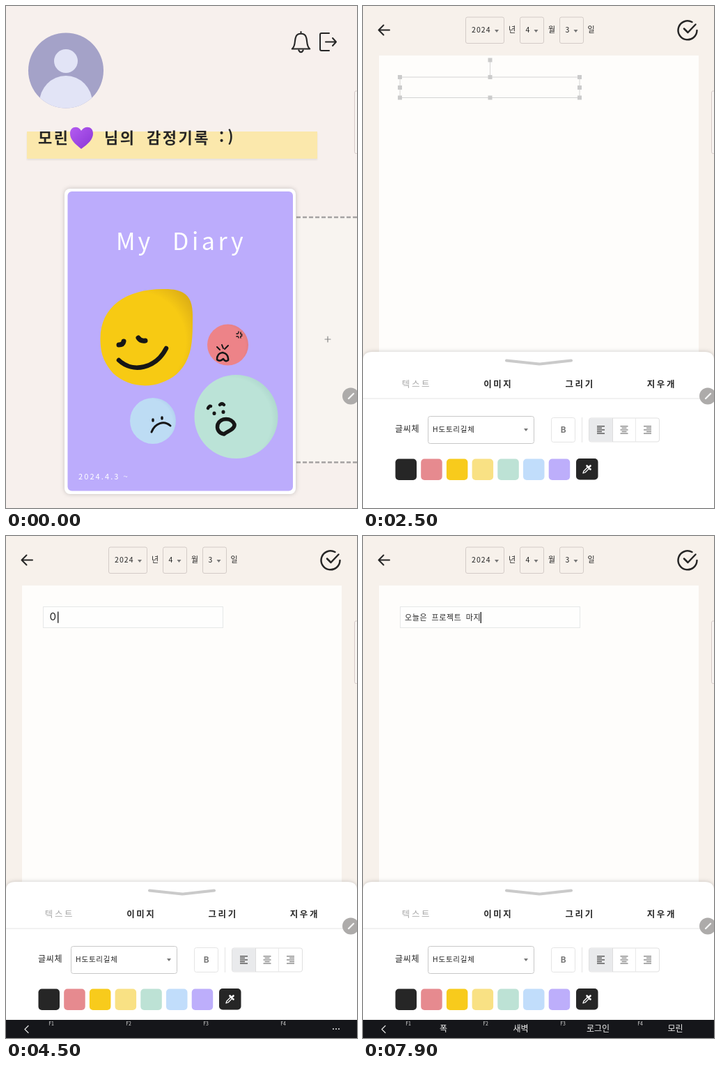
Write an HTML page that moves like this. It is 504 px wide and 720 px high and loops after 8 s.

```html
<!DOCTYPE html>
<html lang="ko">
<head>
<meta charset="utf-8">
<title>Emotion diary</title>
<style>
html, body { margin: 0; width: 100%; height: 100%; overflow: hidden; background: #f7f1ec }
svg { display: block; width: 504px; height: 720px }
text { font-family: "Noto Sans CJK KR", "Noto Sans", sans-serif; white-space: pre }
.ln { fill: none; stroke: #262626; stroke-width: 2; stroke-linecap: round; stroke-linejoin: round }
.field { fill: none; stroke: #d3cbc7 }
.soft { filter: drop-shadow(0 0 3px #0003) }
</style>
</head>
<body>
<svg id="stage" viewBox="0 0 504 720"></svg>
<script>
const LOOP = 8000, INK = '#262626';
const stage = document.getElementById('stage');

const rect = (x, y, w, h, fill, more = '') =>
  `<rect x="${x}" y="${y}" width="${w}" height="${h}" fill="${fill}" ${more}/>`;
const circle = (x, y, r, fill, more = '') =>
  `<circle cx="${x}" cy="${y}" r="${r}" fill="${fill}" ${more}/>`;
const line = (d, more = '') => `<path class="ln" d="${d}" ${more}/>`;
const thick = (d, w, color = '#161616') => line(d, `style="stroke-width:${w};stroke:${color}"`);
const text = (x, y, size, str, { fill = INK, weight = 400, gap = 0, mid = false, id = '' } = {}) =>
  `<text ${id && `id="${id}"`} x="${x}" y="${y}" font-size="${size}" fill="${fill}" font-weight="${weight}"
    letter-spacing="${gap}" word-spacing="${id ? 2.7 : 0}" text-anchor="${mid ? 'middle' : 'start'}">${str}</text>`;
const group = (id, body) => `<g id="${id}">${body}</g>`;
const caret = (x, y) => `<path d="M${x - 3} ${y - 2}h6l-3 4z" fill="#777"/>`;
const bell = (x, y, scale) => `<g transform="translate(${x} ${y}) scale(${scale})">`
  + line('M-12 9H12C7 5 9-2 7-7C5-13-5-13-7-7C-9-2-7 5-12 9ZM-3 11Q0 16 3 11M0-12V-14') + '</g>';

const home = () => {
  const heart = 'M108 205C98 197 92 191 92 183C92 172 104 171 108 179C113 171 125 172 125 183C125 191 118 198 108 205Z';
  const yellow = 'M135.500 480C134 432 172 406 225 406C262 405 269 420 268 450C268 483 267 507 245 528C217 551 178 549 154 527C141 512 136 500 135.500 480Z';
  const bold = { weight: 700, gap: 2.5 };
  return rect(0, 0, 504, 720, '#f7f0ed') + rect(417, 303, 87, 351, '#f8f4f0')
    + circle(86, 92.500, 54, '#a4a2c8')
    + circle(86, 79, 17, '#e2e4f6')
    + '<ellipse cx="86" cy="139" rx="38" ry="39" fill="#e2e4f6" clip-path="url(#face)"/>'
    + bell(423.500, 52, 1.06)
    + line('M464 39H453Q451 39 451 41V62Q451 64 453 64H464M459 51.500H474M469 46L474 51.500L469 57')
    + rect(30, 180, 417, 39, '#fbe8ac', 'style="filter:drop-shadow(0 2px 1px #0001)"')
    + text(46, 197, 22, '모린', bold)
    + `<path d="${heart}" fill="url(#violet)"/>`
    + text(141, 197, 22, '님의', bold)
    + text(202, 197, 22, '감정기록', bold)
    + text(306, 196, 22, ':)', { weight: 700, gap: 5 })
    + line('M417 303H504M417 654.500H504',
        'style="stroke:#a5a2a2;stroke-width:2.500;stroke-linecap:butt;stroke-dasharray:6 3"')
    + thick('M458 478H466M462 474V482', 1.2, '#888')
    + rect(84, 262, 332, 438, '#fff', 'rx="8" class="soft"')
    + rect(88.500, 266, 323.500, 429.500, '#bcacfc', 'rx="6"')
    + text(158, 350, 34, 'My', { fill: '#fff', gap: 4 })
    + text(239, 350, 34, 'Diary', { fill: '#fff', gap: 4.5 })
    + `<path d="${yellow}" fill="url(#gold)"/>`
    + thick('M162 486Q168 486 169 481M190 476Q193 481 200 480', 7)
    + thick('M162 508C182 527 215 520 230 491', 6.5)
    + circle(318.500, 486, 29.500, 'url(#rose)')
    + thick('M303 489L307 493M310 486L312 491M319 487L314 492', 2)
    + thick('M303 507Q303 498 311 497Q320 499 319 508Q315 511 312 506Q307 511 303 507Z', 2.5)
    + thick('M331 470Q334 471 334 467M337 468Q336 471 339 471M331 474Q334 473 334 476M337 476Q336 473 339 473', 1.4)
    + circle(211, 595, 33, 'url(#sky)')
    + thick('M211 593V595M224 590V592', 3.5)
    + thick('M209 611C214 598 227 594 236 602', 3)
    + circle(330.500, 589, 60, 'url(#mint)')
    + thick('M290 577Q292 573 294 574M307 572Q310 569 313 572', 4.5)
    + thick('M299 584V584.500M312 582V582.500', 5)
    + thick('M304 600C308 590 324 590 328 600C329 607 318 610 313 614C306 613 302 607 304 600Z', 5.5)
    + text(104, 679, 11, '2024.4.3 ~', { fill: '#fff', gap: 2.1 });
};

const calendar = () => {
  const days = ['SUN', 'MON', 'TUE', 'WED', 'THU', 'FRI', 'SAT'];
  const book = (x, y, turn, fill, face) => `<g transform="translate(${x} ${y}) rotate(${turn})">`
    + rect(-9, -13, 19, 26, fill, 'rx="2"') + circle(0, 2, 5, face) + '</g>';
  let s = rect(0, 0, 504, 720, '#f6f0eb')
    + thick('M26 30.500H41M26 36H41M26 41.500H41', 1.6, '#333')
    + thick('M170 83L166 87.500L170 92M325 83L329.500 87.500L325 92', 2)
    + text(197, 95, 19, '2024년 4월', { weight: 700, gap: 1.2 })
    + book(401, 89, -7, '#f7dc62', '#b9dfd0') + book(413, 87, 9, '#ea7d83', '#f6ca25')
    + text(429, 93, 9, '일기쓰기', { weight: 500, gap: 1.2 })
    + thick('M428 98.500H470', 1)
    + rect(25, 118, 454, 459, '#fff');
  days.forEach((d, i) => s += text(58.500 + 64.9 * i, 138, 8, d, { weight: 700, gap: .4, mid: true }));
  for (let i = 0; i < 35; i++) {
    const n = i ? (i - 1) % 30 + 1 : 31;
    s += text(32.500 + 64.8 * (i % 7), 167 + 85.5 * Math.floor(i / 7), 10, n, { weight: 500, gap: .8 });
  }
  for (let i = 0; i < 6; i++) s += rect(25, 149.3 + 85.5 * i, 454, 1.5, '#3b3b3b');
  return s + rect(0, 670, 504, 50, '#fff', 'class="soft"')
    + circle(84, 690, 4.7, 'none', 'class="ln" style="stroke-width:1.600"')
    + thick('M75 704V702Q76 697 82 697H87Q93 697 93 702V704Z', 1.6, INK)
    + circle(252, 694, 13, '#e4969a')
    + bell(420.500, 695, .78);
};

const editor = () => {
  const selects = [[147, 56, '2024', 156, 192], [225, 35, '4', 233.500, 248.500], [282, 35, '3', 290.500, 305.500]];
  return rect(0, 0, 504, 720, '#f7f1eb') + rect(23, 71, 459, 640, '#fefdfb')
    + line('M38 34.500H23M29.500 27.500L22.500 34.500L29.500 41.500')
    + selects.map(([x, w, s, tx, cx]) => `<rect class="field" x="${x + .5}" y="16" width="${w - 1}" height="37.500" rx="2.500"/>`
      + text(tx, 38, 10.5, s, { gap: 1.1 }) + caret(cx, 36)).join('')
    + ['년', '월', '일'].map((s, i) => text([214, 271, 327.500][i], 38, 11, s, { mid: true })).join('')
    + thick('M472.500 23A13.500 13.500 0 1 0 479.500 35M461 32.500L466.500 38L477.500 26.500', 2.5, INK);
};

const panel = () => {
  const tabs = ['텍스트', '이미지', '그리기', '지우개'];
  const colors = [INK, '#e68a8f', '#f8cb1c', '#f9e184', '#bde2d5', '#c1ddfb', '#bdaefb'];
  const bars = (x, shift, ink) => [0, 1, 2, 3, 4].map(i => {
    const w = i % 2 ? 7 : 11;
    return rect(x - 5.5 + (11 - w) * shift, 602 + i * 2.6, w, 1.4, ink);
  }).join('');
  return '<path class="soft" d="M0 720V508Q0 496 14 496H490Q504 496 504 508V720Z" fill="#fff"/>'
    + thick('M206 508.500L253 513.500L299 508.500', 4, '#cacaca')
    + tabs.map((s, i) => text(77 + 117.3 * i, 547, 12.5, s,
        { weight: i ? 700 : 400, fill: i ? INK : '#aaa', gap: 2.6, mid: true })).join('')
    + rect(0, 562.500, 504, 1, '#e3e3e3')
    + text(46, 611, 12, '글씨체', { weight: 500, gap: .7 })
    + rect(93.500, 588.500, 152, 39, '#fff', 'rx="3" stroke="#c8c8c8"')
    + text(100, 611, 10.5, 'H도토리길체', { weight: 500, gap: .8 }) + caret(234, 608)
    + rect(270.500, 590.500, 34, 35, '#fff', 'rx="3" stroke="#e4e4e4"')
    + text(287.500, 612, 12, 'B', { weight: 700, fill: '#777', mid: true })
    + rect(314, 590, 1, 36, '#e4e4e4')
    + rect(324.500, 591, 101, 34, '#fff', 'rx="3" stroke="#e0e0e0"')
    + rect(325, 591.500, 33, 33, '#e9eaec')
    + rect(358, 591, 1, 34, '#ddd') + rect(391, 591, 1, 34, '#e8e8e8')
    + bars(341.500, 0, '#555') + bars(375, .5, '#8a8a8a') + bars(408.500, 1, '#8a8a8a')
    + colors.map((c, i) => rect(46.500 + 36.7 * i, 649.500, 30.500, 30.500, c, 'rx="5"')).join('')
    + rect(306, 649, 31.500, 30.500, INK, 'rx="5"')
    + thick('M316 670L317 667L323 661L325 663L319 669Z', 1.3, '#fff')
    + thick('M321.500 659.500L326.500 664.500M324 662L326.500 659.500', 2.6, '#fff');
};

const handles = () => {
  const spots = [[53, 102], [182.500, 102], [311, 102], [53, 117], [311, 117], [53, 131.500], [182.500, 131.500], [311, 131.500], [182.500, 77.500]];
  return thick('M182.500 78V102M53.500 102H311V131.500H53.500Z', 1, '#d4d4d4')
    + spots.map(([x, y]) => rect(x - 3, y - 3, 6, 6, '#cbcbcb')).join('');
};

const bar = () => rect(0, 694, 504, 26, '#15161a')
  + thick('M32 702.500L27 707.500L32 712.500', 1.3, '#ddd')
  + [0, 1, 2, 3].map(i => text(65 + 111 * i, 702, 7, 'F' + (i + 1), { fill: '#ddd', mid: true })).join('');

const dots = () => [470, 474, 478].map(x => circle(x, 707, 1.1, '#ddd')).join('');

const words = () => ['폭', '새벽', '로그인', '모린']
  .map((s, i) => text(115.500 + 111 * i, 711, 12, s, { fill: '#eee', mid: true })).join('');

// Flat fill that darkens towards the right and the rim
const glow = (id, a, b) => `<radialGradient id="${id}" cx=".42" cy=".54" r=".68">
  <stop offset=".74" stop-color="${a}"/><stop offset="1" stop-color="${b}"/></radialGradient>`;

stage.innerHTML = `<defs>
  <clipPath id="face"><circle cx="86" cy="92.500" r="54"/></clipPath>
  <linearGradient id="violet" x2="1" y2="1"><stop stop-color="#b45cf0"/><stop offset="1" stop-color="#8a35d6"/></linearGradient>
  ${glow('gold', '#f7ca13', '#deb016')}${glow('rose', '#ed8388', '#d97880')}
  ${glow('sky', '#bddcf4', '#a9c9ea')}${glow('mint', '#bbe3d7', '#a2cdc5')}</defs>`
  + group('home', home()) + group('calendar', calendar())
  + group('editor', editor())
  + group('handles', handles())
  + group('entry', rect(53.500, 101.500, 258, 30, '#fefefd', 'stroke="#e6e8e8"'))
  + text(62, 123, 17, '이', { id: 'draft' })
  + text(60, 121, 11, '', { id: 'typed', gap: .6 })
  + rect(0, 109, 1.4, 16, INK, 'id="cursor"')
  + group('panel', panel()) + group('keyboard', rect(0, 491.500, 504, 228.500, '#202020'))
  + group('bar', bar()) + group('dots', dots()) + group('words', words())
  + rect(500.500, 122, 10, 89.500, '#f8f4f1', 'rx="2" stroke="#d6cac8"')
  + circle(495, 559.500, 12, '#adabaa', 'id="knob"')
  + thick('M492 563L499 556', 2.4, '#f4f4f4').replace('<path', '<path id="pen"');

const el = id => document.getElementById(id);
const show = (id, on) => el(id).setAttribute('visibility', on ? 'visible' : 'hidden');

// Each entry: start time and the text in the box from then on
const steps = (start, pace, prefix, list) => list.map((s, i) => [start + pace * i, prefix + s]);
const typing = [
  [0, ''],
  ...steps(4800, 100, '', ['ㅇ', '오', '온', '오느', '오늘', '오늘ㅇ', '오늘으', '오늘은', '오늘은 ']),
  ...steps(6800, 95, '오늘은 ', ['ㅍ', '프', '플', '프로', '프롲', '프로제', '프로젝', '프로젝ㅌ',
    '프로젝트', '프로젝트 ㅁ', '프로젝트 마', '프로젝트 마지'])
];

function draw() {
  const t = performance.now() % LOOP;
  const during = (a, b = LOOP) => t >= a && t < b;
  const dark = during(3200, 4100), drafting = during(4400, 4700);
  show('home', t < 100);
  show('calendar', during(100, 1700));
  show('editor', during(1700));
  show('panel', during(1700) && !dark);
  show('handles', during(2000, 2900));
  show('entry', during(2900));
  show('keyboard', dark);
  show('bar', during(4100));
  show('dots', during(4100, 4700));
  show('words', during(4700));
  show('draft', drafting);
  show('knob', !dark);
  el('pen').style.stroke = dark ? '#777' : '#f4f4f4';

  const typed = el('typed');
  typed.textContent = typing.filter(([start]) => start <= t).pop()[1];
  const end = typed.textContent ? typed.getComputedTextLength() : 0;
  el('cursor').setAttribute('x', 59.3 + end);
  show('cursor', during(2900) && !drafting);
  requestAnimationFrame(draw);
}
draw();
</script>
</body>
</html>
```
